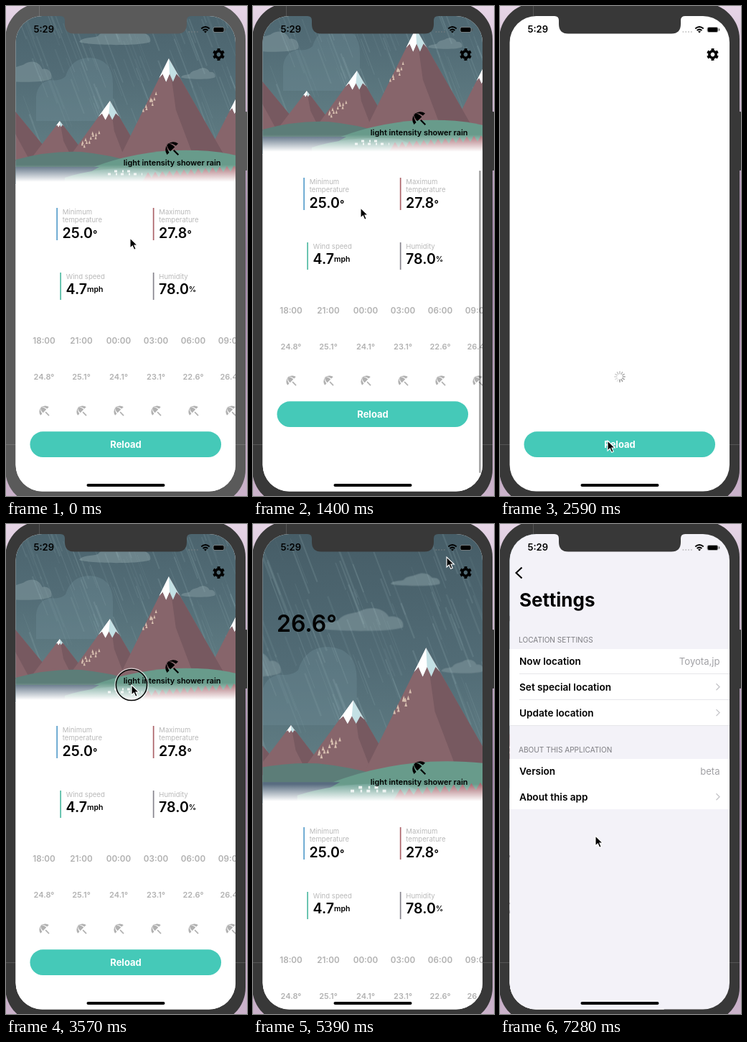
Write an HTML page that moves like this. It is 336 px wide and 682 px high and loops after 7350 ms.

```html
<!DOCTYPE html>
<html lang="en">
<head>
<meta charset="utf-8">
<title>Weather app</title>
<style>
html, body { margin: 0; width: 100%; height: 100%; overflow: hidden; background: #dccadd; }
svg { display: block; font-family: Inter, "Liberation Sans", sans-serif; }
.b { font-weight: 600; }
.mid { text-anchor: middle; }
.end { text-anchor: end; }
</style>
</head>
<body>
<svg width="336" height="682" viewBox="0 0 336 682">
<defs>
  <linearGradient id="wall" x2="0" y2="1">
    <stop stop-color="#e6d5e6"/><stop offset=".5" stop-color="#a184a8"/><stop offset="1" stop-color="#cbb3cb"/>
  </linearGradient>
  <linearGradient id="sky" x2="0" y2="1">
    <stop stop-color="#465d67"/><stop offset=".5" stop-color="#526c76"/><stop offset="1" stop-color="#668489"/>
  </linearGradient>
  <linearGradient id="fade" x2="0" y2="1">
    <stop stop-color="#fff" stop-opacity="0"/><stop offset=".85" stop-color="#fff"/>
  </linearGradient>
  <clipPath id="screen"><rect x="13.5" y="14" width="306.5" height="661.5" rx="37"/></clipPath>
  <path id="umbrella" transform="rotate(-45)" d="M-10 1.6A10.1 10.1 0 0 1 10 1.6H6Q5-5 0-8.6Q-5-5-6 1.6ZM-4 1.6Q-4-5 0-8.6Q4-5 4 1.6ZM-1 3.6H1V12H-1Z"/>
  <path id="more" d="M0-4.5L4.5 0 0 4.5" fill="none" stroke="#c4c4c8" stroke-width="1.3"/>
  <path id="cloud" d="M0 22C4 15 17 17 26 14C33 5 45 7 52 3C66-3 79 2 83 10C93 8 101 14 99 22C86 28 12 27 0 22Z"/>
</defs>

<rect width="336" height="682" fill="url(#wall)"/>
<g id="bezel">
  <rect x="-1" y="-4" width="335" height="699" rx="50"/>
  <rect x="333" y="147" width="3" height="82" rx="1"/>
</g>
<path d="M46.5 0V14M0 610.5H14M320 610.5H334" stroke="#fff" stroke-opacity=".14"/>

<g clip-path="url(#screen)">
  <g id="home">
    <rect x="13" y="14" width="307" height="662" fill="#fff"/>
    <g id="weather">
      <g id="scene">
        <rect x="13" y="-56" width="308" height="304" fill="url(#sky)"/>
        <path fill="#6b8a93" opacity=".4" d="M42 160V126Q44 106 62 103Q76 105 83 98Q91 72 117 72Q149 74 149 108V160Z"/>
        <g fill="#728990" opacity=".85">
          <use href="#cloud" x="102" y="28"/>
          <use href="#cloud" transform="translate(187 -11) scale(.56 .55)"/>
          <use href="#cloud" transform="translate(244 86) scale(.48 .6)"/>
          <use href="#cloud" transform="translate(-14 77) scale(.78 1.1)"/>
        </g>
        <g id="rain" stroke="#b4d0d4"></g>
        <g id="mountains"></g>
        <g id="trees" fill="#d8c0b0"></g>
        <path fill="#5c7d78" d="M13 214Q60 201 105 203Q145 207 180 218V248H13Z"/>
        <path fill="#689b8b" d="M105 231Q165 205 232 201Q285 199 321 208V248H105Z"/>
        <path fill="#586c80" d="M13 224H130L88 248H13Z"/>
        <path fill="#76a79b" d="M82 239Q135 222 205 227L245 248H82Z"/>
        <path id="forest" fill="#a86a71"/>
        <path stroke="#e5eeeb" stroke-width="3" stroke-dasharray="4 7 2 5" d="M142 234H190M151 230H180"/>
      </g>
      <g id="content">
        <rect x="13" y="221" width="308" height="28" fill="url(#fade)"/>
        <rect x="13" y="248" width="308" height="520" fill="#fff"/>
        <text class="b" x="33" y="9.4" font-size="32">26.6°</text>
        <use href="#umbrella" transform="translate(231 198) scale(1.1)"/>
        <text class="b end" x="299.5" y="221.5" font-size="10.9">light intensity shower rain</text>
        <g id="stats"></g>
        <g id="forecast" class="b mid" fill="#b1b1b1"></g>
      </g>
    </g>
    <g id="spinner" stroke="#777" stroke-width="1.3" stroke-linecap="round"></g>
    <g id="reload">
      <rect x="33.5" y="592.3" width="266.5" height="35.8" rx="17.9" fill="#45c9b8"/>
      <text class="mid" x="167" y="615" font-size="13" font-weight="700" fill="#fff">Reload</text>
    </g>
    <g transform="translate(296.5 67.5)" fill="none" stroke="#000">
      <circle r="4.7" stroke-width="3.6"/>
      <circle r="7" stroke-width="2.8" pathLength="12" stroke-dasharray="1.05 .95" transform="rotate(14)"/>
    </g>
    <rect id="bar" x="315.2" width="2.4" rx="1.2"/>
  </g>

  <g id="settings">
    <rect x="13" y="14" width="307" height="662" fill="#f3f2f8"/>
    <path d="M30.5 60.5L22.5 68 30.5 75.5" fill="none" stroke="#000" stroke-width="2.1"/>
    <text x="27" y="114.5" font-size="26" font-weight="700">Settings</text>
    <g font-size="10.1" fill="#7d7d82">
      <text x="26" y="164.5">LOCATION SETTINGS</text>
      <text x="26" y="318">ABOUT THIS APPLICATION</text>
    </g>
    <path fill="#fff" d="M13 174H320V280H13ZM13 327H320V397H13Z"/>
    <path stroke="#e6e6ea" d="M27 208.5H320M27 244.5H320M13 280.5H320"/>
    <g id="rows"></g>
  </g>

  <text class="b" x="38.5" y="37.3" font-size="13">5:29</text>
  <path d="M254.5 36H268" stroke="#888" stroke-opacity=".4" stroke-width="1.8" stroke-dasharray="1.8 2"/>
  <g fill="none" stroke="#000" stroke-width="2">
    <path d="M272.3 31.4Q278 26.7 283.7 31.4M274.6 34Q278 31.2 281.4 34"/>
    <path d="M278 37.5L276 35.5Q278 34 280 35.5Z" fill="#000" stroke="none"/>
    <rect x="289" y="29.5" width="15" height="7" rx="2" stroke="#888" stroke-width=".7"/>
    <rect x="290" y="30.5" width="13" height="5" rx="1" fill="#000" stroke-width="1"/>
    <path d="M305.7 31.5V34.5" stroke="#555" stroke-width="1.2"/>
  </g>
  <rect x="112.5" y="665" width="109" height="4" rx="2"/>
</g>
<path id="notch" d="M76 13V14Q82 14 82 20V25Q82 38.5 95 38.5H239Q252 38.5 252 25V20Q252 14 258 14V13Z"/>

<g id="pointer">
  <g id="ring" fill="none">
    <circle r="22.8" stroke="#fff" stroke-opacity=".6" stroke-width="2"/>
    <circle r="21.6" stroke="#000" stroke-width="1.5"/>
  </g>
  <path d="M0 0V14L3.3 11 5.7 16.3 8.2 15.2 5.9 10H10.3Z" stroke="#fff" stroke-width="1.1"/>
</g>
</svg>

<script>
const $ = id => document.getElementById(id);
const move = (id, x, y) => $(id).setAttribute('transform', `translate(${x} ${y})`);
const show = (id, on) => { $(id).style.display = on ? '' : 'none'; };
const repeat = (n, f) => Array.from({ length: n }, (_, i) => f(i)).join('');
const poly = (points, fill) => `<path d="M${points.join('L')}Z" fill="${fill}"/>`;

let seed = 11;
const rnd = () => (seed = seed * 16807 % 2147483647) / 2147483647;

// Landscape
$('rain').innerHTML = repeat(140, () => {
  const len = 25 + rnd() * 50;
  return `<path d="M${rnd() * 330} ${rnd() * 215 - 60}l${len * .38} ${len}" stroke-width="${.6 + rnd() * 1.6}" opacity="${.05 + rnd() * .1}"/>`;
});

function mountain(x, y, left, right, snow) {
  const base = 216, k = snow / (base - y), top = [x, y];
  const edge = Array.from({ length: 7 }, (_, i) => [
    x - (x - left) * k + (right - left) * k * i / 6,
    y + snow * (i % 6 ? (i % 2 ? .8 : 1.2) : 1)
  ]);
  return poly([top, [right, base], [left, base]], '#87656b') +
    poly([top, [right, base], [x + (right - x) * .45, base], [x + (right - x) * .12, y + (base - y) * .5]], '#775960') +
    poly([top, ...edge], '#c3e0e4') + poly([top, ...edge.slice(0, 4)], '#fff');
}
$('mountains').innerHTML = mountain(4, 136, -60, 70, 0) + mountain(322, 126, 276, 370, 20) +
  mountain(75, 160, 32, 118, 7) + mountain(145, 132, 84, 194, 22) + mountain(227, 73, 156, 309, 27);

const grove = (x, y, w, h, n) => repeat(n, i => {
  const u = i / (n - 1) - .5;
  return `<path d="M${x + u * w + rnd() * 6 - 3} ${y - u * h + rnd() * 12 - 6}l1.5 5h-3z"/>`;
});
$('trees').innerHTML = grove(117, 183, 24, 16, 12) + grove(201, 132, 15, 17, 9);
$('forest').setAttribute('d', 'M188 248' + repeat(27, i => `L${193 + i * 5} ${(i % 2 ? 232 : 240) - i * .4}`) + 'V248Z');

// Readings
const stats = [['Minimum temperature', '25.0', '°', '#5a9fcc'], ['Maximum temperature', '27.8', '°', '#ac6369'],
  ['Wind speed', '4.7', 'mph', '#52bba4'], ['Humidity', '78.0', '%', '#88858e']];
$('stats').innerHTML = stats.map(([label, value, unit, color], i) => {
  const low = i > 1, x = i % 2 ? 204.8 : low ? 75.3 : 70.3, y = low ? 371 : 281, h = low ? 38 : 45;
  const lines = low ? [label] : label.split(' ');
  return `<rect x="${x}" y="${y}" width="1.7" height="${h}" fill="${color}"/>` +
    lines.map((s, n) => `<text x="${x + 8.5}" y="${y + 9 + n * 11.3}" font-size="9.6" fill="#b9b9b9">${s}</text>`).join('') +
    `<text class="b" x="${x + 8.3}" y="${low ? 401 : 322.8}" font-size="19.6">${value}` +
    `<tspan font-size="${low ? 10.5 : 14}" dy="${low ? -3 : 0}">${unit}</tspan></text>`;
}).join('');

const temps = [24.8, 25.1, 24.1, 23.1, 22.6, 26.4];
$('forecast').innerHTML = temps.map((temp, i) => {
  const x = 53 + 52 * i, hour = String((18 + 3 * i) % 24).padStart(2, '0');
  return `<text x="${x}" y="469.8" font-size="11.7">${hour}:00</text>
    <text x="${x}" y="520" font-size="11">${temp}°</text>
    <use href="#umbrella" transform="translate(${x} 563) scale(.83)"/>`;
}).join('');

const rows = [['Now location', 'Toyota,jp'], ['Set special location'], ['Update location'], ['Version', 'beta'], ['About this app']];
$('rows').innerHTML = rows.map(([label, value], i) => {
  const y = 191 + 35.8 * i + (i > 2 ? 45.6 : 0);
  return `<text class="b" x="27" y="${y + 4.9}" font-size="13.6">${label}</text>` +
    (value ? `<text class="end" x="306.5" y="${y + 4.9}" font-size="13.1" fill="#a0a0a4">${value}</text>`
           : `<use href="#more" x="301.5" y="${y}"/>`);
}).join('');

$('spinner').innerHTML = repeat(12, i => `<path d="M0-4.2V-7.3" transform="rotate(${i * 30})" opacity="${.2 + i * .06}"/>`);

// Motion
const LOOP = 7350, TOP = 141;
const ramp = (t, a, b) => { const u = Math.min(1, Math.max(0, (t - a) / (b - a))); return u * u * (3 - 2 * u); };
const mix = (a, b, u) => a + (b - a) * u;

const moves = [ // start, end, x, y
  [140, 770, 172, 543], [900, 1260, 150, 281], [1500, 2000, 150, 605], [2800, 3450, 175, 224],
  [3850, 4450, 180, 430], [4700, 5350, 270, 46], [5450, 5650, 292, 66], [6000, 6800, 40, 56], [6930, 7280, 133, 434]
];
const cursor = t => moves.reduce(([x, y], [a, b, x2, y2]) => {
  const u = ramp(t, a, b);
  return [mix(x, x2, u), mix(y, y2, u)];
}, [173, 323]);

const drags = [{ start: 140, end: 1400, rest: 0 }, { start: 3850, end: 4700, rest: TOP }];
const touches = [[120, 1230], [2120, 2260], [3500, 4700], [5720, 5860]];

// The page follows the finger, then springs to its resting place.
function pull(t) {
  const drag = drags.findLast(d => t >= d.start);
  if (!drag) return 0;
  const held = cursor(Math.min(t, drag.end))[1] - cursor(drag.start)[1];
  return mix(held, drag.rest, ramp(t, drag.end, drag.end + 350));
}

function draw(t) {
  const raw = pull(t), inside = Math.min(TOP, Math.max(0, raw));
  const over = (raw - inside) * (raw > TOP ? .5 : 1), shift = inside + over;
  const bottom = 248 + shift, scale = Math.max(1, (bottom - 14) / 302.8);
  const loading = t >= 2240 && t < 2940;

  show('weather', !loading);
  show('spinner', loading);
  $('scene').setAttribute('transform', `translate(167 ${bottom}) scale(${scale}) translate(-167 -248)`);
  move('content', 0, shift);
  move('reload', 0, shift);
  $('spinner').setAttribute('transform', `translate(167 516) rotate(${Math.floor(t * 12 / 1000) * 30})`);

  const bar = $('bar');
  bar.setAttribute('y', 88 + (TOP - inside) * 99 / TOP + Math.max(0, -over));
  bar.setAttribute('height', 463 - Math.abs(over));
  bar.setAttribute('opacity', .38 * Math.max(...drags.map(d =>
    ramp(t, d.start, d.start + 100) - ramp(t, d.end + 400, d.end + 600))));

  const slide = ramp(t, 5880, 6380);
  move('home', -92 * slide, 0);
  move('settings', 306 * (1 - slide), 0);
  show('settings', slide > 0);

  move('pointer', ...cursor(t));
  show('ring', touches.some(([a, b]) => t >= a && t < b));
  for (const id of ['bezel', 'notch']) $(id).setAttribute('fill', t < 70 ? '#5a5a5a' : '#383838');
}

const start = performance.now();
function tick() {
  draw((performance.now() - start) % LOOP);
  requestAnimationFrame(tick);
}
tick();
</script>
</body>
</html>
```
